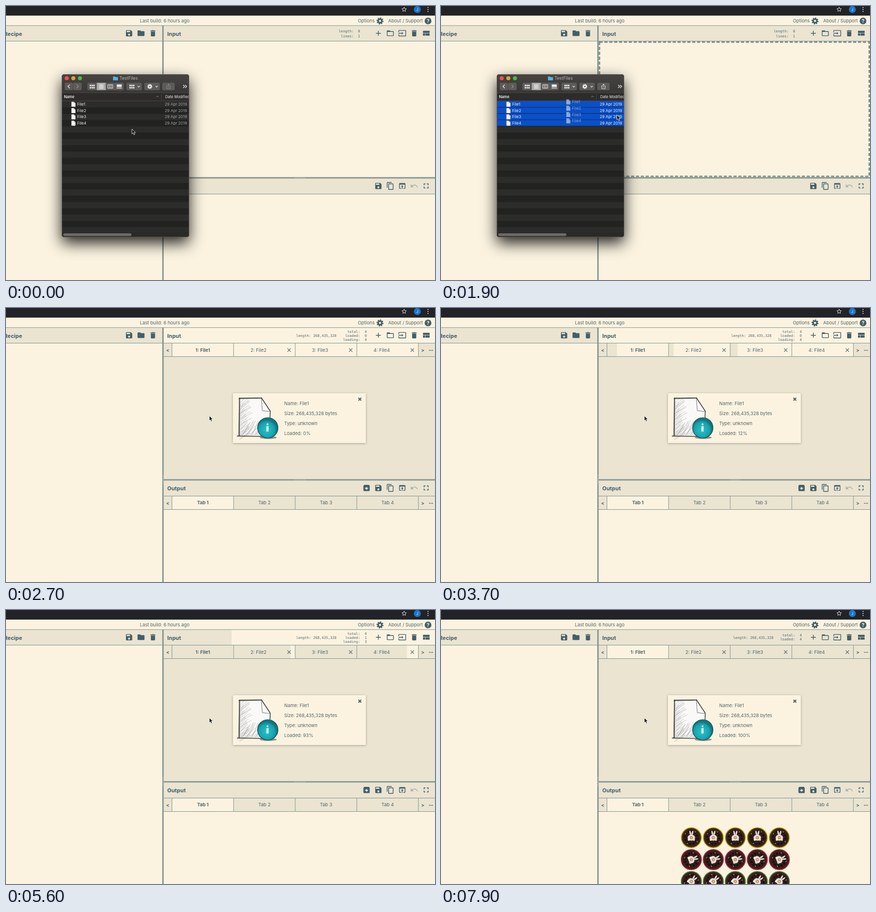
Recreate the animation shown at these times as an HTML page. Size 862 px wide and 550 px high, loop 8000 ms.

```html
<!DOCTYPE html>
<html lang="en">
<head>
<meta charset="utf-8">
<title>Loading several files</title>
<style>
html, body { margin: 0; width: 100%; height: 100%; overflow: hidden; background: #fbf3e0; }
svg { display: block; width: 100vw; height: 100vh; font-family: Inter, Roboto, sans-serif; }
text { white-space: pre; }
.mono { font-family: "DejaVu Sans Mono", monospace; }
#finder { filter: drop-shadow(0 12px 15px rgba(0, 0, 0, .85)); }
#card { filter: drop-shadow(0 1px 2px rgba(0, 0, 0, .3)); }
</style>
</head>
<body>
<svg id="stage" viewBox="0 0 862 550"></svg>
<script>
const CREAM = '#fbf3e0', PANEL = '#eae4d1', LINE = '#839592', INK = '#52656b', ICON = '#435f69';
const LOOP = 8000, ROW = 12.65;
const range = n => [...Array(n).keys()];
const each = (n, fn) => range(n).map(fn).join('');

const rect = (x, y, w, h, fill, more = '') =>
  `<rect x="${x}" y="${y}" width="${w}" height="${h}" fill="${fill}" ${more}/>`;
const circle = (x, y, r, fill, more = '') => `<circle cx="${x}" cy="${y}" r="${r}" fill="${fill}" ${more}/>`;
const path = (d, stroke, width = 1, more = '') =>
  `<path d="${d}" fill="none" stroke="${stroke}" stroke-width="${width}" ${more}/>`;
// y is the vertical middle of the capitals
const text = (x, y, s, size = 9.25, fill = INK, more = '') =>
  `<text x="${x}" y="${y + size * .36}" font-size="${size}" fill="${fill}" ${more}>${s}</text>`;
const group = (id, content, more = '') => `<g id="${id}" ${more}>${content}</g>`;
const BOLD = 'font-weight="700"', MID = 'text-anchor="middle"', END = 'text-anchor="end"';
const MID_BOLD = `${MID} ${BOLD}`;

const glyphs = {
  save: 'M17 3H5a2 2 0 0 0-2 2v14a2 2 0 0 0 2 2h14a2 2 0 0 0 2-2V7zM12 19a3 3 0 1 1 0-6a3 3 0 0 1 0 6zM15 9H5V5h10z',
  folder: 'M10 4H4a2 2 0 0 0-2 2v12a2 2 0 0 0 2 2h16a2 2 0 0 0 2-2V8a2 2 0 0 0-2-2h-8z',
  open: 'M10 4H4a2 2 0 0 0-2 2v12a2 2 0 0 0 2 2h16a2 2 0 0 0 2-2V8a2 2 0 0 0-2-2h-8zM20 18H4V8h16z',
  trash: 'M6 19a2 2 0 0 0 2 2h8a2 2 0 0 0 2-2V7H6zM19 4h-3.5l-1-1h-5l-1 1H5v2h14z',
  add: 'M19 13h-6v6h-2v-6H5v-2h6V5h2v6h6z',
  input: 'M21 3H3a2 2 0 0 0-2 2v4h2V5h18v14H3v-4H1v4a2 2 0 0 0 2 2h18a2 2 0 0 0 2-2V5a2 2 0 0 0-2-2zM11 16l4-4-4-4v3H1v2h10z',
  layout: 'M3 19h6v-7H3zM10 19h12v-7H10zM3 5v6h19V5z',
  copy: 'M16 1H4a2 2 0 0 0-2 2v14h2V3h12zM19 5H8a2 2 0 0 0-2 2v14a2 2 0 0 0 2 2h11a2 2 0 0 0 2-2V7a2 2 0 0 0-2-2zM19 21H8V7h11z',
  browser: 'M19 4H5a2 2 0 0 0-2 2v12a2 2 0 0 0 2 2h4v-2H5V8h14v10h-4v2h4a2 2 0 0 0 2-2V6a2 2 0 0 0-2-2zM12 10l-4 4h3v6h2v-6h3z',
  undo: 'M12.5 8c-2.65 0-5.05 1-6.9 2.6L2 7v9h9l-3.6-3.6c1.4-1.2 3.1-1.9 5.1-1.9 3.5 0 6.5 2.3 7.6 5.5l2.4-.8C21 11 17 8 12.5 8z',
  full: 'M7 14H5v5h5v-2H7zM5 10h2V7h3V5H5zM17 17h-3v2h5v-5h-2zM14 5v2h3v3h2V5z',
  archive: 'M20.5 5.2L19 3.5Q18.6 3 18 3H6Q5.4 3 5 3.5L3.5 5.2Q3 5.8 3 6.5V19a2 2 0 0 0 2 2h14a2 2 0 0 0 2-2V6.5Q21 5.8 20.5 5.2zM12 17.5L6.5 12H10v-2h4v2h3.5z'
};
const icon = (name, x, y, more = '') =>
  `<path d="${glyphs[name]}" fill="${ICON}" fill-rule="evenodd" transform="translate(${x} ${y}) scale(.7) translate(-12 -12)" ${more}/>`;
const icons = (names, x, y) => names.map((n, i) => icon(n, x + 24 * i, y, n === 'undo' ? 'opacity=".35"' : '')).join('');
const gear = (x, y, r, color) =>
  circle(x, y, r * .53, 'none', `stroke="${color}" stroke-width="${r * .45}"`) +
  circle(x, y, r * .84, 'none', `stroke="${color}" stroke-width="${r * .32}" pathLength="16" stroke-dasharray="1.1 .9"`);
const cross = (x, y, r, color, width) => path(`M${x - r} ${y - r}l${2 * r} ${2 * r}m0 ${-2 * r}l${-2 * r} ${2 * r}`, color, width);

function browserPage() {
  let star = '';
  for (let i = 0; i < 10; i++) {
    const a = i * Math.PI / 5, r = i % 2 ? 2.2 : 4.8;
    star += `${i ? 'L' : 'M'}${800 + r * Math.sin(a)} ${7 - r * Math.cos(a)}`;
  }
  return rect(0, 0, 862, 550, CREAM) + rect(0, 0, 862, 19.3, '#222328') + path(star + 'z', '#d8d8da') +
    circle(826.5, 7, 7, '#1a78cc') + text(826.5, 7, 'J', 7, '#dcecfb', MID) +
    each(3, i => circle(848, 3 + 4 * i, 1.1, '#ddd')) +
    text(269, 29.7, 'Last build: 6 hours ago') + text(707, 29.7, 'Options') + gear(751.5, 30, 7, ICON) +
    text(768, 29.7, 'About / Support') + circle(848, 30, 6.8, ICON) + text(848, 30, '?', 10, CREAM, MID_BOLD) +
    rect(0, 40, 314, 30, PANEL) + text(-4, 55.8, 'Recipe', 11, ICON, BOLD) + icons(['save', 'folder', 'trash'], 247.3, 54.7) +
    rect(317, 40, 545, 30, CREAM) + rect(317, 40, 545, 30, PANEL, 'id="titleFill"') +
    text(324, 55.8, 'Input', 11, ICON, BOLD) + icons(['add', 'open', 'input', 'trash', 'layout'], 748.2, 54.7) +
    rect(317, 346, 545, 31, PANEL) + text(324, 362.5, 'Output', 11, ICON, BOLD) +
    icons(['save', 'copy', 'browser', 'undo', 'full'], 748.2, 361.2) +
    path('M0 39.3H862M0 70.5H862M317 377.5H862', LINE) +
    rect(314, 39, 2.8, 511, LINE) + rect(317, 343.5, 545, 2.8, LINE) +
    path('M580 345H601M315.5 335V355', '#dfe0d4', 1, 'stroke-dasharray="1 1.5"');
}

const tabX = i => 333.5 + 123.8 * i;
function tabStrip(y, content) {
  return rect(317, y, 545, 26, PANEL) + content +
    path(each(5, i => `M${tabX(i)} ${y}v26`) + `M317 ${y + 26.5}H862`, LINE) +
    text(325, y + 14, '&lt;', 9.5, INK, MID_BOLD) + text(837.5, y + 14, '&gt;', 9.5, INK, MID_BOLD) +
    each(3, i => circle(851 + 3 * i, y + 14, 1, INK));
}

function fileSketch() {
  const hatch = each(34, i => {
    const wobble = 3 * Math.sin(i * 7.3), y = 184 + i * 2.15;
    return `M${469 + i % 3} ${y + 9}L${480 + wobble + (i % 5) * 3} ${y - 4}`;
  });
  const lower = each(20, i => `M${472 + 2 * i} ${256 + i % 2}l${17 + 4 * Math.sin(i * 5)} -${19 + i % 4 * 4}`);
  return `<path d="M469 181L513 180L531 207L530 257L468 258z" fill="#faf9f8"/>` +
    path(hatch + lower, '#777', .6, 'opacity=".6"') +
    path('M468 181L514 180.5M469 180L468 258M464 257L528 258M513 180L531 207L530 230', '#302e2e', 1.4) +
    path('M467 182.5L515 181M470 181L469.5 256M513 181L515 206L531 208', '#55504e', .8) +
    '<ellipse cx="527" cy="260" rx="17" ry="3" fill="#333" opacity=".5"/>' +
    circle(526, 240.5, 20.5, 'url(#teal)', 'stroke="#124c52" stroke-width="1.2"') +
    circle(525.5, 233.5, 1.9, '#e4f8f8') + rect(523.2, 237, 4.4, 11, '#e4f8f8', 'rx="1"');
}

function loadingView() {
  const inputTabs = each(4, i =>
    rect(tabX(i), 71, 123.8, 26, CREAM) + rect(tabX(i), 71, 0, 26, PANEL, `id="bar${i}"`) +
    text(i ? tabX(i) + 50 : 395.5, 84.5, `${i + 1}: File${i + 1}`, 9.4, INK, i ? MID : MID_BOLD) +
    (i ? cross(tabX(i) + 111.5, 84.5, 3.3, INK, 1.2) : ''));
  const outputTabs = rect(tabX(0), 378, 123.8, 26, CREAM) + each(4, i =>
    text(tabX(i) + 62, 391, `Tab ${i + 1}`, 9.4, INK, i ? MID : MID_BOLD));
  const card = rect(456, 171, 267, 100, CREAM) + fileSketch() + cross(711, 183, 2.8, INK, 2.2) +
    ['Name: File1', 'Size: 268,435,328 bytes', 'Type: unknown'].map((s, i) => text(559, 191.5 + 20 * i, s)).join('') +
    text(559, 251.5, '', 9.25, INK, 'id="percent"');
  return rect(317, 97, 545, 246, PANEL) + tabStrip(71, inputTabs) + tabStrip(378, outputTabs) +
    icon('archive', 724.5, 361.2) + group('card', card);
}

const counter = (label, value, labelEnd, valueEnd, y) => {
  const style = 'class="mono" ' + END;
  return text(labelEnd, y, label + ':', 7.1, INK, style) + text(valueEnd, y, value, 7.1, INK, style);
};
const emptyStats = counter('length', 0, 698.5, 711.5, 50) + counter('lines', 1, 698.5, 711.5, 60);
function loadStats(loaded) {
  const busy = loaded < 4, top = busy ? 47 : 50.5;
  return text(busy ? 583 : 587, 55.5, 'length: 268,435,328', 7.1, INK, 'class="mono"') +
    counter('total', 4, 711.5, 725, top) + counter('loaded', loaded, 711.5, 725, top + 8) +
    (busy ? counter('loading', 4 - loaded, 711.5, 725, top + 16) : '');
}

function disc(col, row) {
  const ring = ['#d3bd2c', '#bd2440', '#5d8744'][row];
  const ears = [-13, 13].map(a =>
    `<ellipse cy="-9.5" rx="1.5" ry="4.8" fill="#ece6e0" stroke="#8b7b70" stroke-width=".4" transform="rotate(${a})"/>`).join('');
  return `<g transform="translate(${503 + 44.2 * col} ${457 + 44 * row})">` +
    circle(0, 0, 20.3, '#35201a', `stroke="${ring}" stroke-width="1.6"`) +
    circle(0, 0, 18.3, 'none', `stroke="${ring}" stroke-dasharray="1 2.2" opacity=".7"`) +
    circle(0, 0, 12.5, 'none', 'stroke="#1c100d" stroke-width="4" stroke-dasharray="4 2.5"') +
    `<g class="hare" data-row="${row}">` +
    each(4, i => circle(14 * Math.cos(i * 1.57 + .6), 14 * Math.sin(i * 1.57 + .6), 1, '#c9b3a0')) +
    ears + '<ellipse rx="7.5" ry="6" fill="#e6e2de"/>' + circle(-5, 4, 2.3, '#f4f2f0') + circle(5, 4, 2.3, '#ddd8d4') +
    circle(0, 0, 3.2, '#c98d5c') + circle(0, 0, 1.3, '#f0d2a8') + '</g></g>';
}

const rowMiddle = i => 197.3 + ROW * i;
const fileLabel = i => {
  const y = rowMiddle(i);
  return `<path d="M131.5 ${y - 5}h5l3 3v7h-8z" fill="#f6f6f6"/>` + path(`M136.5 ${y - 5}v3h3`, '#aaa', .6) +
    text(143, y, `File${i + 1}`, 8, '#f0f0f0');
};
function finderWindow() {
  const button = (x, w) => rect(x, 154, w, 15, '#5d5b59', 'rx="2.5"');
  const grid = (x, color) => each(6, i => rect(x + i % 3 * 3.6, i < 3 ? 158 : 162.5, 2.7, 3, color));
  const down = x => path(`M${x} 160.5l2.2 2.3l2.2-2.3`, '#ddd', 1.2);
  const rows = each(21, i => rect(112, 191 + ROW * i, 256, ROW, i % 2 ? '#222221' : '#2c2c2a'));
  const files = each(4, i => rect(112.5, 191 + ROW * i, 255.5, ROW - 1, '#0850cc', `id="pick${i}"`) + fileLabel(i) +
    text(319, rowMiddle(i), '29 Apr 2019', 7.8, '#a5a5a4', `id="date${i}"`));
  return rect(112, 137, 256, 327, '#222221') + rows +
    rect(112, 137, 256, 37, 'url(#bar)') + rect(112, 174, 256, 17, '#2e2c2a') +
    path('M112 174H368M112 190.5H368M312.5 176V189', '#514f4d', .8) +
    ['#fb4f4b', '#dba52f', '#4cbb3c'].map((c, i) => circle(122 + 13.3 * i, 145, 4.1, c)).join('') +
    '<path d="M215 141.5h4l1 1.2h5v6.5h-10z" fill="#55b4e4"/>' + text(228, 145.3, 'TestFiles', 8.8, '#bab8b6') +
    button(118, 16.5) + button(135, 17) + path('M128 158l-3.5 3.5l3.5 3.5', '#eee', 1.3) +
    path('M142 158l3.5 3.5l-3.5 3.5', '#93918f', 1.3) +
    button(163.5, 73) + rect(182.5, 154, 18, 15, '#acaaa8') + grid(168.3, '#eee') +
    path('M187 158h9m-9 2.4h9m-9 2.4h9m-9 2.4h9', '#fff', 1) +
    path('M204.5 158h10v7h-10zm3.3 0v7m3.3-7v7', '#eee', 1) +
    rect(222.5, 157.5, 10, 5, '#eee') + each(4, i => rect(222.5 + i * 2.7, 163.7, 1.9, 2, '#eee')) +
    button(242, 31) + grid(248, '#eee') + down(264.5) +
    button(278, 31) + gear(289, 161.5, 5, '#eee') + down(300.5) + button(314, 25) +
    path('M324.5 160h-1.5v6h7v-6h-1.5M326.5 163.5v-7m-2 2l2-2l2 2', '#eee', .9, 'id="share"') +
    path('M356 158.5l3 3l-3 3m4-6l3 3l-3 3', '#eee', 1.2) +
    text(116.5, 182, 'Name', 7.4, '#eee', 'font-weight="600"') + text(320, 182, 'Date Modified', 7.4, '#eee') +
    path('M302 183l2.3-2.3l2.3 2.3', '#aaa', .8) + files +
    rect(112, 454, 256, 10, '#292928') + rect(115, 456.3, 137, 5.4, '#6d6b6a', 'rx="2.7"') +
    rect(112.5, 137.5, 255, 326, 'none', 'rx="4.5" stroke="#5b5957" stroke-width=".8"');
}

const stage = document.getElementById('stage');
stage.innerHTML = `<defs>
  <linearGradient id="bar" x2="0" y2="1"><stop stop-color="#474442"/><stop offset="1" stop-color="#393735"/></linearGradient>
  <radialGradient id="teal" cx=".45" cy=".6"><stop stop-color="#25c3c9"/><stop offset=".75" stop-color="#18a3ad"/><stop offset="1" stop-color="#127680"/></radialGradient>
  <clipPath id="frame"><rect x="112" y="137" width="256" height="327" rx="5"/></clipPath></defs>` +
  browserPage() + group('loading', loadingView()) + group('stats', '') +
  group('discs', each(15, i => disc(i % 5, Math.floor(i / 5)))) +
  group('drop', rect(318.5, 72.5, 542, 269.5, 'none', 'stroke="#84938f" stroke-width="3" stroke-dasharray="6.3 3.5"')) +
  group('finder', `<g clip-path="url(#frame)">${finderWindow()}</g>`) +
  group('ghost', each(4, fileLabel), 'opacity=".55"') +
  group('arrow', '<path d="M0 0V9.8L2.3 7.7L4 11.5L5.8 10.7L4.2 7H7.3z" fill="#111" stroke="#fff" stroke-width=".8"/>') +
  group('beam', path('M-2.5 -5Q0 -5 0 -3.5Q0 -5 2.5 -5M0 -4V4M-2.5 5Q0 5 0 3.5Q0 5 2.5 5M-1.2 1.5h2.4', '#222', 1.1));

const el = Object.fromEntries([...stage.querySelectorAll('[id]')].map(e => [e.id, e]));
const hares = [...stage.querySelectorAll('.hare')];
const show = (id, on) => el[id].style.display = on ? '' : 'none';
const clamp = (v, lo, hi) => Math.min(hi, Math.max(lo, v));

// time, x, y
const pointerPath = [[0, 253, 247], [200, 253, 247], [700, 238, 198], [1200, 233, 223.5], [1400, 233, 223.5], [2200, 408.5, 216.5]];
function pointerAt(t) {
  const next = pointerPath.findIndex(p => p[0] > t);
  if (next < 0) return pointerPath.at(-1).slice(1);
  const [a, b] = [pointerPath[next - 1], pointerPath[next]];
  const u = (t - a[0]) / (b[0] - a[0]), k = u * u * (3 - 2 * u);
  return [a[1] + (b[1] - a[1]) * k, a[2] + (b[2] - a[2]) * k];
}

const bars = [[20, 54], [10, 55], [15, 58], [0, 53]]; // width at 3.7 s, growth per second
const spins = [[45, -30], [30, 27], [22, 14]];         // angle at 6.4 s, degrees per second
let shownStats = '';

function draw(t) {
  const [x, y] = pointerAt(t), opened = t >= 2500, dragging = t > 1400 && t < 2200;
  for (const id of ['arrow', 'beam']) el[id].setAttribute('transform', `translate(${x} ${y})`);
  show('beam', t >= 2200 && !opened);
  show('arrow', t < 2200 || opened);
  show('finder', t < 2050);
  show('drop', t > 1400 && x > 317 && !opened);
  show('ghost', dragging);
  el.ghost.setAttribute('transform', `translate(${x - 233} ${y - 223.5})`);

  range(4).forEach(i => {
    const picked = t > 700 || y < 191 + ROW * (i + 1);
    show('pick' + i, picked);
    el['date' + i].setAttribute('fill', picked ? '#f0f0f0' : '#a5a5a4');
  });
  el.share.setAttribute('opacity', t > 700 || y < 241 ? 1 : .35);

  const widths = bars.map(([w, rate]) => clamp(w + rate * (t - 3700) / 1000, 0, 123.8));
  const done = widths.map(w => w >= 123.8), loaded = done.filter(Boolean).length;
  widths.forEach((w, i) => el['bar' + i].setAttribute('width', i === 0 && done[0] ? 0 : w));
  const percent = done[0] ? 100 : Math.floor(clamp(12.01 + .043 * (t - 3700), 0, 99));
  el.percent.textContent = `Loaded: ${percent}%`;
  el.titleFill.setAttribute('width', opened ? 545 * loaded / 4 : 545);
  show('loading', opened);

  const stats = opened ? loadStats(loaded) : emptyStats;
  if (stats !== shownStats) el.stats.innerHTML = shownStats = stats;

  show('discs', t >= 6100);
  const step = Math.floor(t / 100) / 10;
  for (const hare of hares) {
    const [angle, speed] = spins[hare.dataset.row];
    hare.setAttribute('transform', `rotate(${angle + speed * (step - 6.4)})`);
  }
}

function tick() {
  draw(performance.now() % LOOP);
  requestAnimationFrame(tick);
}
tick();
</script>
</body>
</html>
```
